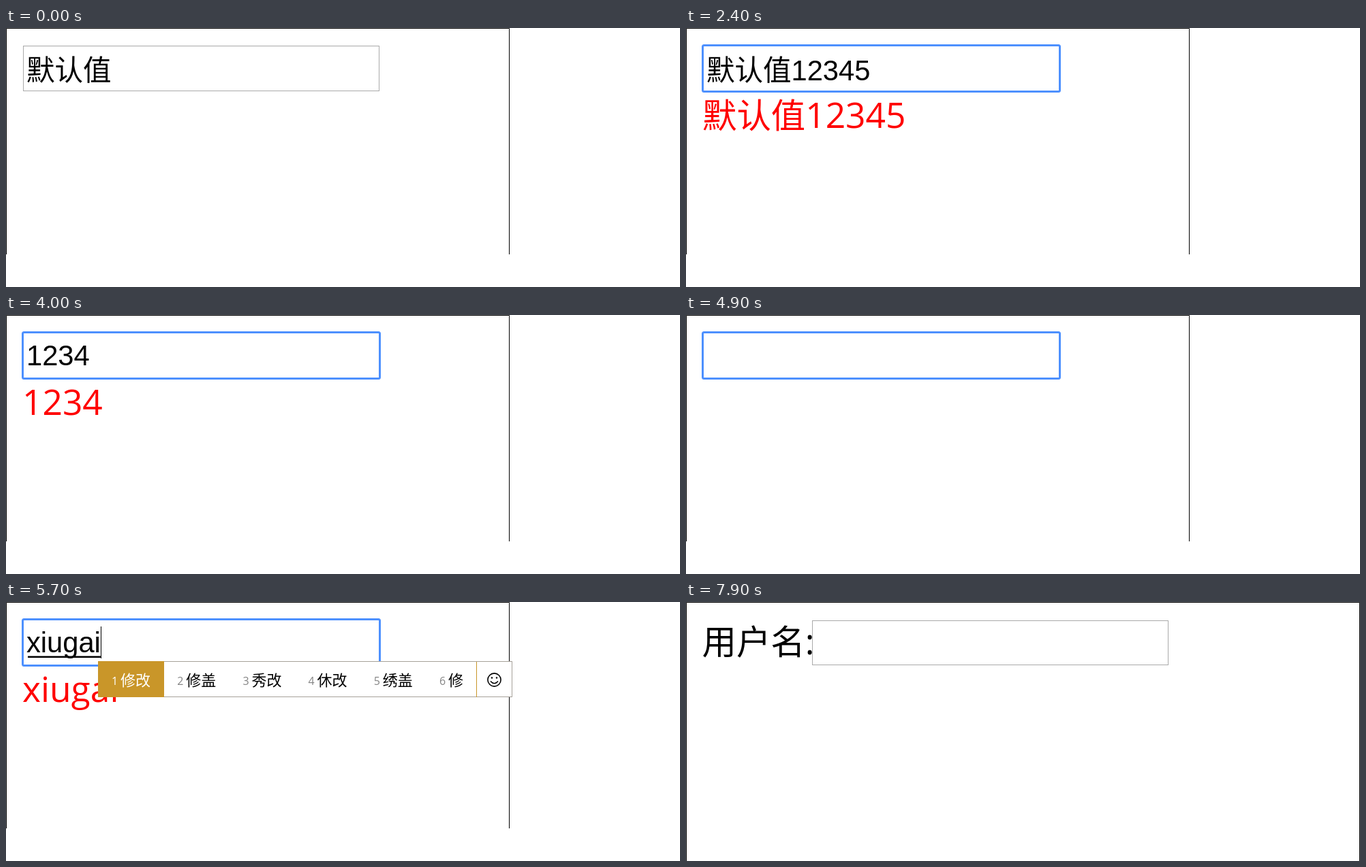
These frames come from a looping animation (989x381 px, 8 s). An HTML page:

```html
<!DOCTYPE html>
<html lang="zh-CN">
<head>
<meta charset="utf-8">
<style>
  html, body { margin: 0; width: 100%; height: 100%; overflow: hidden; background: #fff; }
  svg { display: block; }
  .cjk { font-family: "Noto Sans CJK SC", "Noto Sans CJK", sans-serif; }
  .typed { font-family: "Liberation Sans", Arial, sans-serif; font-size: 41.67px; }
  .typed .cjk { font-size: 41.5px; }
  .echo { font-family: "Open Sans", "Noto Sans", sans-serif; font-size: 51.5px; }
  .echo .cjk { font-size: 50.4px; }
  .option { font-family: "Open Sans", "Noto Sans", sans-serif; font-size: 16px; }
  .option .cjk { font-size: 22px; }
</style>
</head>
<body>
<svg id="stage" width="989" height="381" viewBox="0 0 989 381"></svg>
<script>
const LOOP = 8000;
const TEXT_X = 30;
const GOLD = '#c99629';
const svg = document.getElementById('stage');

const hasCjk = s => /[\u4e00-\u9fff]/.test(s);

function add(parent, tag, attrs = {}) {
  const node = document.createElementNS('http://www.w3.org/2000/svg', tag);
  for (const key in attrs) node.setAttribute(key, attrs[key]);
  parent.appendChild(node);
  return node;
}

const box = (parent, x, y, width, height, attrs) =>
  add(parent, 'rect', { x, y, width, height, ...attrs });

// Sets each script run in its own font.
function write(parent, cls, x, y, content, fill) {
  const node = add(parent, 'text', { class: cls, x, y, fill });
  for (const run of content.match(/[\u4e00-\u9fff]+|[^\u4e00-\u9fff]+/g) || []) {
    add(node, 'tspan', hasCjk(run) ? { class: 'cjk' } : {}).textContent = run;
  }
  return node;
}

const outline = stroke => ({ fill: 'none', stroke });

function drawFrame(right, bottom) {
  add(svg, 'path', { d: `M.5 ${bottom}V.5H${right}V${bottom}`, ...outline('#000') });
}

function drawField(state) {
  if (state.focus) box(svg, 24.5, 25.5, 524, 68, { rx: 2, 'stroke-width': 3, ...outline('#4d90fe') });
  else box(svg, 25.5, 26.5, 522, 66, outline('#a9a9a9'));

  const lift = hasCjk(state.text) ? 0 : 2;
  if (state.selected) box(svg, 31, 38, 240, 47, { fill: '#3390ff' });
  const baseline = lift ? 74 : 77;
  const typed = write(svg, 'typed', TEXT_X, baseline, state.text, state.selected ? '#fff' : '#000');
  const end = TEXT_X + (state.text ? typed.getComputedTextLength() : 0);
  const caretX = Math.round(end);
  if (state.options) box(svg, 32, 79.5, caretX - 31, 2.5, { fill: '#000' });
  if (state.caret) box(svg, caretX, 38 - lift, 1, 47, { fill: '#000' });
  return caretX;
}

function drawOptions(left, options) {
  const words = options.split(' ');
  const widths = words.map(word => 52.2 + 22 * word.length);
  const total = widths.reduce((a, b) => a + b, 0);
  const panel = add(svg, 'g', { transform: `translate(${left} 87)` });
  box(panel, .5, .5, Math.round(total) + 52, 52, { fill: '#fff', stroke: '#a6a199' });
  box(panel, 0, 0, Math.round(widths[0]) + 1, 53, { fill: GOLD });

  let x = 0;
  words.forEach((word, i) => {
    write(panel, 'option', x + 20, 35, String(i + 1), i ? '#858585' : '#fff');
    write(panel, 'option', x + 33, 36, word, i ? '#000' : '#fff');
    x += widths[i];
  });

  const edge = Math.round(total);
  box(panel, edge, 1, 1, 52, { fill: GOLD });
  const face = add(panel, 'g', {
    transform: `translate(${edge + 26.5} 27.5)`, 'stroke-width': 1.6, ...outline('#000')
  });
  add(face, 'circle', { r: 9.6 });
  add(face, 'path', { d: 'M-5.5 2Q0 8.5 5.5 2' });
  for (const eye of [-3.5, 3.5]) add(face, 'circle', { cx: eye, cy: -3, r: 1.2, fill: '#000', stroke: 'none' });
}

function drawDemo(state) {
  drawFrame(738.5, 333);
  if (state.echo) write(svg, 'echo', 24, 147, state.text, '#f00');
  const caretX = drawField(state);
  if (state.options) drawOptions(caretX - 4, state.options);
}

function drawNext() {
  drawFrame(988.5, 381);
  write(svg, 'echo', 23.5, 77, '用户名:', '#000');
  box(svg, 185.5, 27.5, 522, 65, outline('#a9a9a9'));
}

// Each step changes only the listed properties.
const steps = [
  [0, { text: '默认值' }],
  [700, { focus: true, caret: true }],
  [1000, { text: '默认值1', echo: true }],
  [1100, { text: '默认值12' }],
  [1400, { text: '默认值123' }],
  [1700, { text: '默认值1234' }],
  [2000, { text: '默认值12345' }],
  [2400, { caret: false }],
  [2500, { selected: true }],
  [2700, { text: '1', selected: false, caret: true }],
  [2900, { text: '12' }],
  [3200, { text: '123' }],
  [3500, { text: '1234' }],
  [4000, { caret: false }],
  [4200, { text: '123' }],
  [4400, { text: '12', caret: true }],
  [4600, { text: '1' }],
  [4800, { text: '' }],
  [4900, { caret: false }],
  [5100, { text: 'x', caret: true, options: '想 下 小 些 写 需 先' }],
  [5300, { text: 'xi', options: '系 洗 细 西 息 喜 习' }],
  [5500, { text: 'xiu', options: '修 秀 休 绣 羞 袖 锈' }],
  [5600, { text: 'xiug', options: '修改 修个 秀个 修过 修管 修' }],
  [5700, { text: 'xiugai', options: '修改 修盖 秀改 休改 绣盖 修' }],
  [5800, { text: '修改', options: '' }],
  [6300, { caret: false }],
  [6800, { caret: true }],
  [7300, { caret: false }],
  [7700, { caret: true }],
  [7900, { next: true }]
];

let shown = -1;

function render(time) {
  const passed = steps.filter(([at]) => at <= time);
  if (passed.length === shown) return;
  shown = passed.length;
  const state = Object.assign({}, ...passed.map(([, change]) => change));
  svg.replaceChildren();
  if (state.next) drawNext();
  else drawDemo(state);
}

const start = performance.now();
function tick() {
  render((performance.now() - start) % LOOP);
  requestAnimationFrame(tick);
}
tick();
</script>
</body>
</html>
```
